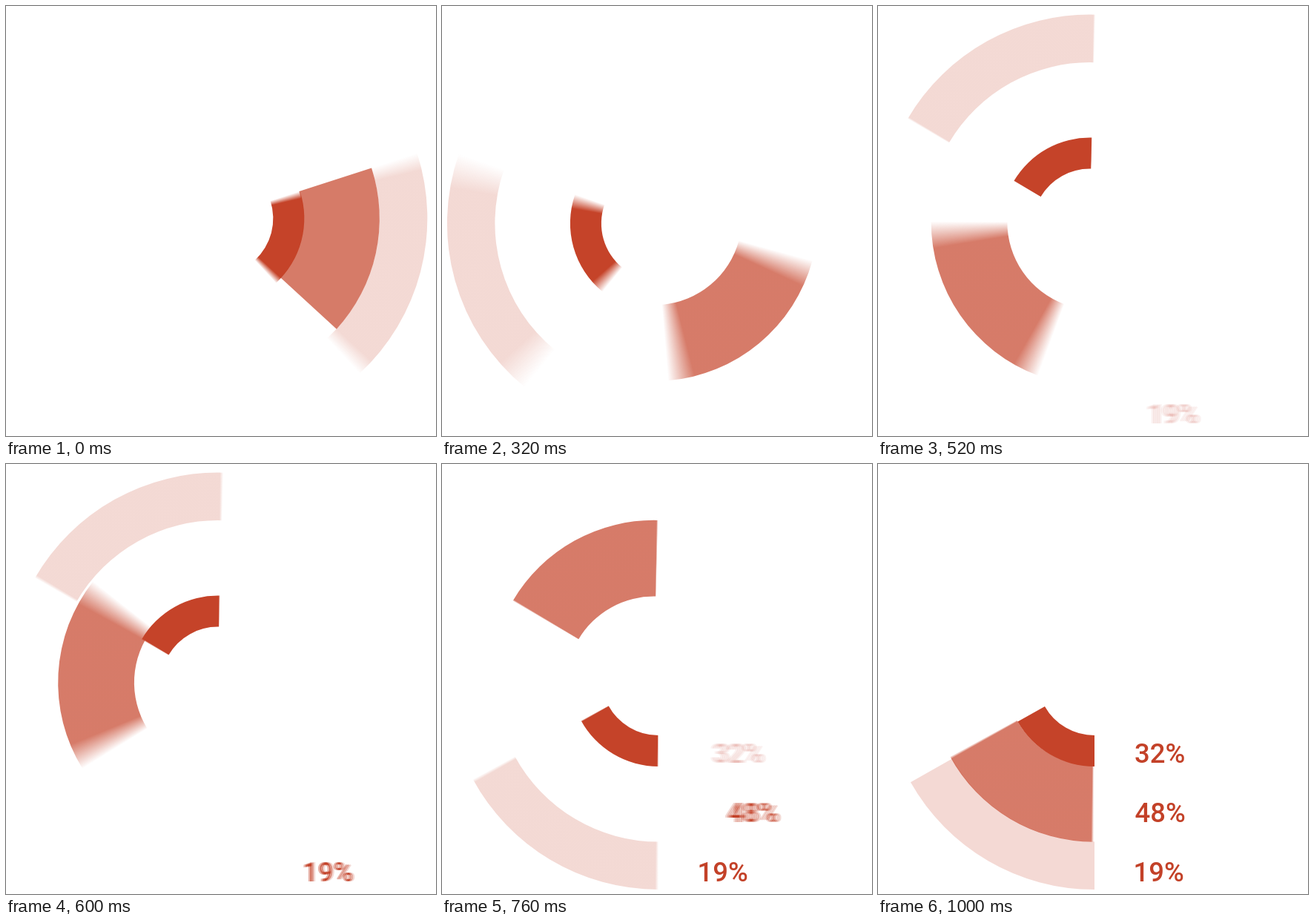
Recreate the animation shown at these times as an HTML page with a canvas. Size 580 px wide and 580 px high, loop 1200 ms.

```html
<!DOCTYPE html>
<html>
<head>
<meta charset="utf-8">
<style>
  html, body { margin: 0; height: 100%; overflow: hidden; background: #fff; }
  canvas { display: block; }
</style>
</head>
<body>
<canvas id="stage" width="580" height="580"></canvas>
<script>
const ctx = document.getElementById('stage').getContext('2d');
const LOOP = 1200, STEP = 40, SHUTTER = 10;
const RGB = '197,67,41', SPAN = 60.5;
const PIVOT = { x: 286.7, y: 291 };

const rings = [
  { inner: 77, outer: 119, alpha: 1, delay: 0 },
  { inner: 220.5, outer: 285, alpha: 0.2, delay: 0 },
  { inner: 118, outer: 220.7, alpha: 0.7, delay: 240, drift: -1 }
];
const labels = [
  { text: '19%', x: 344.5, y: 563, start: 480 },
  { text: '48%', x: 346.5, y: 483, start: 600 },
  { text: '32%', x: 346, y: 403, start: 720 }
];

const clamp = (v, lo = 0, hi = 1) => Math.min(hi, Math.max(lo, v));
const rad = deg => deg * Math.PI / 180;
const easeInOut = p => p < 0.5 ? 2 * p * p : 1 - 2 * (1 - p) ** 2;
const color = alpha => `rgba(${RGB},${alpha})`;

// Share of the swing back, 0 to 1
const swingBack = t => easeInOut(clamp((t - 600) / 160));

// Steady turn, short braking, then a fast swing back; degrees
function startAngle(t) {
  const turn = t < 440 ? 0.475 * Math.max(t, 0)
                       : 229 - 20 * clamp((524 - t) / 84) ** 2;
  return -18 + turn - 121 * swingBack(t);
}

// Angular motion blur is a linear alpha ramp at both ends of the sector
function drawRing(ring, time) {
  const t = time - ring.delay;
  const a = startAngle(t - SHUTTER), b = startAngle(t + SHUTTER);
  const lo = Math.min(a, b), blur = Math.abs(b - a);
  const tilt = rad((a + b) / 2 - 110.7);
  const x = PIVOT.x + 5.66 * Math.cos(tilt) + (ring.drift || 0) * swingBack(t);
  const y = PIVOT.y + 5.66 * Math.sin(tilt);
  const from = rad(lo), to = rad(lo + SPAN + blur);

  let fill = color(ring.alpha);
  if (blur > 0.05) {
    fill = ctx.createConicGradient(from, x, y);
    fill.addColorStop(0, color(0));
    fill.addColorStop(blur / 360, color(ring.alpha));
    fill.addColorStop(SPAN / 360, color(ring.alpha));
    fill.addColorStop((SPAN + blur) / 360, color(0));
  }
  ctx.fillStyle = fill;
  ctx.beginPath();
  ctx.arc(x, y, ring.outer, from, to);
  ctx.arc(x, y, ring.inner, to, from, true);
  ctx.fill();
}

// Slide out to the right and back while fading in
const slide = t => 59 * clamp(1 - Math.abs(t - 120) / 120);

function drawLabel({ text, x, y, start }, time) {
  const t = time - start, samples = 5;
  if (t <= 0) return;
  ctx.fillStyle = color(clamp(t / 120) / samples);
  for (let i = 0; i < samples; i++) {
    const shift = SHUTTER * (2 * i / (samples - 1) - 1);
    ctx.fillText(text, x + slide(t + shift), y);
  }
}

function draw(time) {
  ctx.clearRect(0, 0, 580, 580);
  ctx.globalCompositeOperation = 'source-over';
  rings.forEach(ring => drawRing(ring, time));
  ctx.globalCompositeOperation = 'lighter';
  ctx.font = '500 36.5px Roboto, sans-serif';
  labels.forEach(label => drawLabel(label, time));
}

function tick() {
  // A small lead keeps each step from showing late
  draw(Math.floor(performance.now() / STEP + 0.2) * STEP % LOOP);
  requestAnimationFrame(tick);
}
tick();
</script>
</body>
</html>
```
